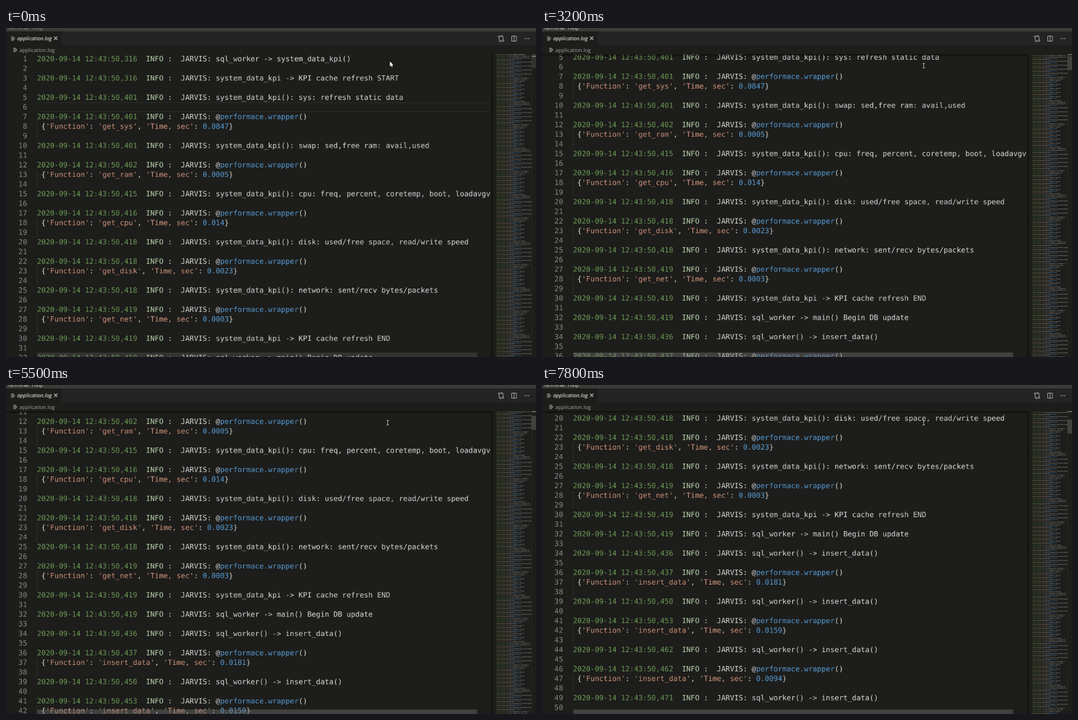
An HTML page with a canvas that plays this animation: 949 px wide and 590 px high, repeating every 8 s.

```html
<!DOCTYPE html>
<html lang="en">
<head>
<meta charset="utf-8">
<title>application.log</title>
<style>
  html, body { margin: 0; width: 100%; height: 100%; overflow: hidden; background: #1d1d1b; }
  canvas { display: block; }
</style>
</head>
<body>
<canvas id="stage" width="949" height="590"></canvas>
<script>
const LOOP = 8000;
const TOP = 47, BOTTOM = 590, EDITOR_RIGHT = 868;
const MAP_X = 877.6, MAP_CHAR = 0.72, MAP_LINE = 1.441, MAP_RIGHT = 941;
const BG = '#1d1d1b', PLAIN = '#d4d4d4';
const TOKEN_COLORS = ['#6a9955', '#b5cea8', '#569cd6', '#ce9178'];
const TOKEN = /(\d{4}-\d\d-\d\d \S+)|(INFO)|(performace\.wrapper|\d\.\d+)|('[^']*')|\s+|[\w():,>\/.-]+|./g;

// The editor is laid out in whole screen pixels, then scaled down to the stage.
const SCALE = 0.7204, EDITOR_Y = 46.7;
const LINE = 24, CHAR = 18 * 0.60205, TEXT_X = 77, NUMBER_X = 52.5;
const MONO = '18px "DejaVu Sans Mono", monospace';

const ctx = document.getElementById('stage').getContext('2d');

// ---- log content ----
const entry = (ms, text) => `2020-09-14 12:43:50,${ms}  INFO :  JARVIS: ${text}`;
const timed = (ms, name, sec) =>
  [entry(ms, '@performace.wrapper()'), ` {'Function': '${name}', 'Time, sec': ${sec}}`, ''];
const note = (ms, text) => [entry(ms, text), ''];
const kpi = (ms, text) => note(ms, 'system_data_kpi' + text);
const insert = (ms, doneMs, sec) =>
  [...note(ms, 'sql_worker() -> insert_data()'), ...timed(doneMs, 'insert_data', sec)];

const cycle = [
  ...note(316, 'sql_worker -> system_data_kpi()'),
  ...kpi(316, ' -> KPI cache refresh START'),
  ...kpi(401, '(): sys: refresh static data'),
  ...timed(401, 'get_sys', '0.0847'),
  ...kpi(401, '(): swap: sed,free ram: avail,used'),
  ...timed(402, 'get_ram', '0.0005'),
  ...kpi(415, '(): cpu: freq, percent, coretemp, boot, loadavgv'),
  ...timed(416, 'get_cpu', '0.014'),
  ...kpi(418, '(): disk: used/free space, read/write speed'),
  ...timed(418, 'get_disk', '0.0023'),
  ...kpi(418, '(): network: sent/recv bytes/packets'),
  ...timed(419, 'get_net', '0.0003'),
  ...kpi(419, ' -> KPI cache refresh END'),
  ...note(419, 'sql_worker -> main() Begin DB update'),
  ...insert(436, 437, '0.0181'),
  ...insert(450, 453, '0.0159'),
  ...insert(462, 462, '0.0094'),
  ...insert(471, 473, '0.0092'),
  ...insert(483, 485, '0.0092'),
];
const log = Array.from({ length: 400 }, (_, i) => cycle[i % cycle.length]);

function tokens(line) {
  return [...line.matchAll(TOKEN)].map(match => {
    const kind = match.slice(1).findIndex(group => group !== undefined);
    return { text: match[0], column: match.index, color: TOKEN_COLORS[kind] || PLAIN };
  });
}
const tokenized = log.map(tokens);

// ---- drawing helpers ----
function rect(x, y, w, h, color, target = ctx) {
  target.fillStyle = color;
  target.fillRect(x, y, w, h);
}
function text(str, x, y, font, color, target = ctx, align = 'left') {
  target.font = font;
  target.fillStyle = color;
  target.textAlign = align;
  target.fillText(str, x, y);
}
function stroke(path, color, width = 1) {
  ctx.strokeStyle = color;
  ctx.lineWidth = width;
  ctx.stroke(new Path2D(path));
}
function clipped(x, y, w, h, paint) {
  ctx.save();
  ctx.beginPath();
  ctx.rect(x, y, w, h);
  ctx.clip();
  paint();
  ctx.restore();
}
function shadow(x0, y0, x1, y1, w, h) {
  const fade = ctx.createLinearGradient(x0, y0, x1, y1);
  fade.addColorStop(0, 'rgba(0,0,0,0)');
  fade.addColorStop(1, 'rgba(0,0,0,.55)');
  rect(Math.min(x0, x1), Math.min(y0, y1), w, h, fade);
}
function layer(width, height) {
  const canvas = document.createElement('canvas');
  canvas.width = width;
  canvas.height = height;
  return canvas.getContext('2d');
}

const editor = layer(Math.ceil(EDITOR_RIGHT / SCALE), Math.ceil((BOTTOM - EDITOR_Y) / SCALE));

// The minimap paints each character as a tiny block, rendered once.
const minimap = layer(MAP_RIGHT - Math.floor(MAP_X), Math.ceil(log.length * MAP_LINE));
tokenized.forEach((line, row) => {
  for (const { text: str, column, color } of line) {
    [...str].forEach((char, i) => {
      if (char === ' ') return;
      minimap.globalAlpha = 0.22 + (char.charCodeAt(0) * 37 % 10) / 24;
      rect(MAP_X % 1 + (column + i) * MAP_CHAR, row * MAP_LINE, MAP_CHAR, 1.1, color, minimap);
    });
  }
});

// ---- motion (scroll in screen pixels) ----
const SCROLL_TIMES = [2700, 2800, 3900, 4600, 5500, 6100, 6700, 7400, 7800];
const scrollAt = t => 50 * SCROLL_TIMES.filter(time => t >= time).length;

function pointerAt(t) {
  const step = Math.min(4, Math.max(0, Math.floor((t - 2200) / 100))) / 4;
  return { x: 688.3 - 4.8 * step, y: 61 + 6.5 * step };
}

// ---- parts ----
function drawFileIcon(x, y) {
  stroke(`M${x} ${y}h5 M${x} ${y + 2}h7 M${x} ${y + 4}h7 M${x} ${y + 6}h5`, '#c0c0c0', 0.9);
}

function drawHeader(focused) {
  rect(0, 0, 949, TOP, BG);
  rect(0, 0, 949, 6, '#3c3b37');
  clipped(0, 0, 949, 6, () => {
    const color = focused ? '#dfdbd2' : '#8b8983';
    const font = '9.4px "Open Sans", sans-serif';
    text('Terminal', 3, 2.7, font, color);
    text('Help', 46, 2.7, font, color);
  });

  rect(100, 6, 849, 25, '#232423');
  drawFileIcon(9, 16);
  text('application.log', 20, 22.2, 'italic 9.5px "Open Sans", sans-serif', '#ffffff');
  stroke('M86.2 15.5l5.8 5.8m0-5.8l-5.8 5.8', '#d0d0d0', 1.1);
  drawFileIcon(13, 36.3);
  text('application.log', 24, 42.8, '9.3px "Open Sans", sans-serif', '#a3a3a2');

  const icon = '#c5c5c5';
  stroke('M883 17v5.5q0 1 1 1h3 m-2-2l2 2-2 2 M890 21v-5.5q0-1-1-1h-3 m2-2l-2 2 2 2', icon, 0.9);
  stroke('M881.6 15.3a1.4 1.4 0 1 0 2.8 0a1.4 1.4 0 1 0-2.8 0 M888.6 22.7a1.4 1.4 0 1 0 2.8 0a1.4 1.4 0 1 0-2.8 0', icon, 0.9);
  stroke('M905.5 14.5h8.5v9h-8.5z M909.75 14.5v9', icon, 0.9);
  for (const x of [928.2, 931.8, 935.4]) rect(x, 18.3, 1.5, 1.5, icon);
}

function drawEditor(t, scroll) {
  const { width, height } = editor.canvas;
  editor.textRendering = 'geometricPrecision';
  rect(0, 0, width, height, BG, editor);

  const activeY = (t < 600 ? 5 : 0) * LINE - scroll;
  rect(TEXT_X, activeY, width, 2, '#282826', editor);
  rect(TEXT_X, activeY + LINE - 2, width, 2, '#282826', editor);

  const first = Math.floor(scroll / LINE);
  for (let row = first; row < first + 33; row++) {
    const top = row * LINE - scroll;
    const baseline = top + 18;
    text(row + 1, NUMBER_X, baseline, MONO, '#858585', editor, 'right');
    if (log[row].startsWith(' ')) rect(TEXT_X, top, 1, 2 * LINE, '#404040', editor);
    for (const { text: str, column, color } of tokenized[row]) {
      if (str.trim()) text(str, TEXT_X + column * CHAR, baseline, MONO, color, editor);
    }
  }
  const caretOn = t >= 600 && Math.floor(t / 500) % 2 === 1;
  if (caretOn) rect(Math.round(TEXT_X + 73 * CHAR), -scroll, 2, LINE, '#aeafad', editor);

  clipped(0, TOP, EDITOR_RIGHT, BOTTOM - TOP, () => {
    ctx.imageSmoothingQuality = 'high';
    ctx.drawImage(editor.canvas, 0, EDITOR_Y, width * SCALE, height * SCALE);
  });
}

function drawMinimap(scroll) {
  const start = Math.floor(scroll / LINE - scroll * SCALE * 0.0446 / MAP_LINE);
  clipped(EDITOR_RIGHT, TOP, MAP_RIGHT - EDITOR_RIGHT, BOTTOM - TOP, () => {
    ctx.drawImage(minimap.canvas, Math.floor(MAP_X), TOP + 0.4 - start * MAP_LINE);
  });
  shadow(EDITOR_RIGHT, TOP, 872, TOP, 4, BOTTOM - TOP);
}

function drawScrollbars(t, scroll) {
  const slider = `rgba(121,121,121,${t < 100 ? 0.24 : 0.4})`;
  rect(56, 582, 787.5, 8, slider);
  rect(MAP_RIGHT, TOP, 0.7, BOTTOM - TOP, '#30302e');
  rect(MAP_RIGHT, TOP + scroll * SCALE * 0.0466, 8, 25, slider);
  rect(MAP_RIGHT, t < 600 ? 50 : TOP, 8, 1.4, 'rgba(160,160,160,.8)');
}

function drawPointer(t) {
  if (t < 100) {
    const arrow = new Path2D('M687.4 59.8v9.2l2.1-1.9 1.4 3.2 1.5-.7-1.4-3.1h2.8z');
    ctx.strokeStyle = '#000';
    ctx.lineWidth = 1.2;
    ctx.stroke(arrow);
    ctx.fillStyle = '#fff';
    ctx.fill(arrow);
    return;
  }
  const { x, y } = pointerAt(t);
  stroke(`M${x - 2} ${y - 4}h4 M${x} ${y - 4}v8 M${x - 2} ${y + 4}h4`, '#d8d8d8', 0.9);
}

function draw() {
  const t = performance.now() % LOOP;
  const scroll = scrollAt(t);
  ctx.textRendering = 'geometricPrecision';
  rect(0, 0, 949, 590, BG);
  drawEditor(t, scroll);
  drawHeader(t >= 500);
  drawMinimap(scroll);
  if (scroll) shadow(0, TOP + 4.3, 0, TOP, EDITOR_RIGHT, 4.3);
  drawScrollbars(t, scroll);
  drawPointer(t);
  requestAnimationFrame(draw);
}
draw();
</script>
</body>
</html>
```
